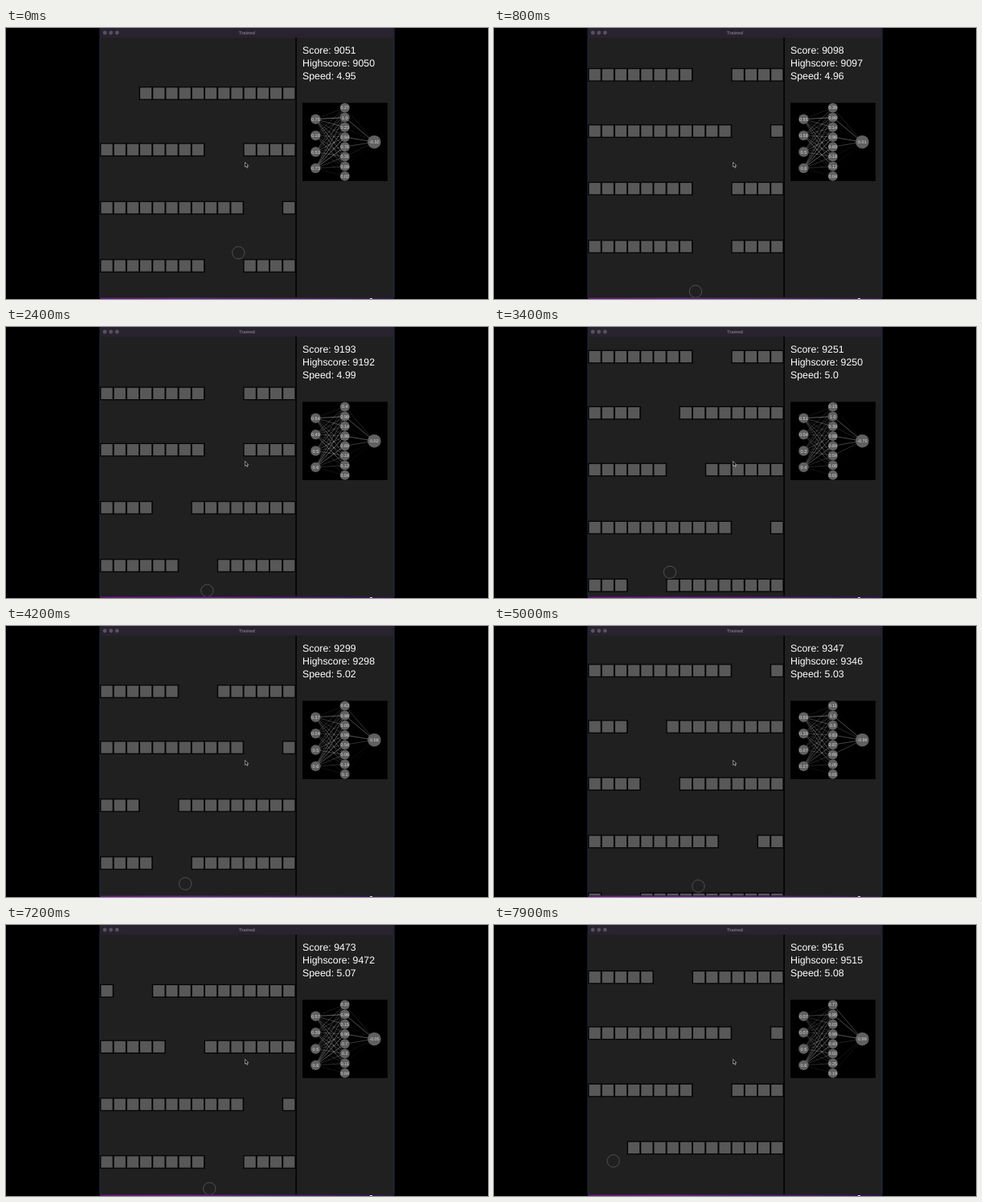
An HTML page for the animation above (8000 ms loop, 600 px wide and 338 px high).

```html
<!DOCTYPE html>
<html lang="en">
<head>
<meta charset="utf-8">
<title>Trained</title>
<style>
  html, body { margin: 0; width: 100%; height: 100%; overflow: hidden; background: #000; }
  svg { display: block; width: 600px; height: 338px; }
  text { font-family: "Liberation Sans", Arial, sans-serif; fill: #fff; text-rendering: geometricPrecision; }
  .stat { font-size: 12.36px; }
  .node { font-size: 5.5px; text-anchor: middle; fill: #e0e0e0; }
  .title { font-size: 5.6px; font-weight: bold; text-anchor: middle; fill: #7d7882; }
</style>
</head>
<body>
<svg viewBox="0 0 600 338">
  <defs>
    <clipPath id="field"><rect x="117" y="12" width="244" height="324"/></clipPath>
    <linearGradient id="dock">
      <stop offset="0" stop-color="#6a1a80"/>
      <stop offset=".3" stop-color="#6a2490"/>
      <stop offset="1" stop-color="#32174a"/>
    </linearGradient>
  </defs>
  <rect width="600" height="338"/>
  <rect x="116.5" width="367" height="336.4" fill="#263a5c"/>
  <rect x="117.3" width="365.4" height="336.4" fill="#202020"/>
  <rect x="117.3" width="365.4" height="12" fill="#29222f"/>
  <g fill="#57525d">
    <circle cx="123" cy="6" r="2.4"/><circle cx="130.6" cy="6" r="2.4"/><circle cx="138.2" cy="6" r="2.4"/>
  </g>
  <text class="title" x="300" y="8">Trained</text>
  <g id="play" clip-path="url(#field)"></g>
  <rect x="360.4" y="12" width="1.5" height="324"/>
  <rect x="117" y="336.4" width="366" height="1.6" fill="url(#dock)"/>
  <rect x="453" y="337" width="3" height="1" fill="#ddd"/>
  <g id="stats"></g>
  <rect x="369" y="93.3" width="106" height="97.7"/>
  <g id="net"></g>
  <path d="M297.6 167.4v6l1.4-1.2 1 2.2 1-.5-1-2.1h1.9z" fill="#000" stroke="#ddd" stroke-width=".6"/>
</svg>
<script>
const LOOP = 8000, STEP = 100;
const LEFT = 117.5, CELL = 16.2, COLS = 15, WIDTH = CELL * COLS;
const FLOOR = 328.8, REST = 16.3, SEEN = 341;
const HOME = LEFT + WIDTH * .55;

// Score at a few times; scrolling and speed follow from it
const times = [0, 1500, 3400, 5000, 6000, 7200, 7900];
const points = [0, 89, 200, 296, 354, 422, 465];
const FIRST_SCORE = 9051;

// First empty column of each row, in order of appearance
const holes = [0, 8, 11, 8, 8, 8, 4, 6, 11, 3, 4, 10, 1, 5, 11, 8, 0];

const byId = id => document.getElementById(id);
function add(parent, tag, attrs) {
  const el = document.createElementNS("http://www.w3.org/2000/svg", tag);
  for (const k in attrs) el.setAttribute(k, attrs[k]);
  return parent.appendChild(el);
}

const decimal = v => v.toFixed(2).replace(/0$/, "");
const sigmoid = v => 1 / (1 + Math.exp(-v));

function pointsAt(t) {
  let i = 1;
  while (i < times.length - 1 && t > times[i]) i++;
  const p = Math.max(0, (t - times[i - 1]) / (times[i] - times[i - 1]));
  return points[i - 1] + (points[i] - points[i - 1]) * p;
}

// Rows climb slightly faster as points grow, and bunch up near the top
function rowY(k, t) {
  const n = pointsAt(t);
  const y = 79.3 + 72.5 * k - .025 * k * k - n * (2.026 + .00006 * n);
  return y < 150 ? y + (150 - y) * .03 : y;
}

// The ball steers to the hole of the row it rides, drops through, then heads home
const SIM_START = -70, SIM_STEP = 10;
function simulate() {
  const path = [], dt = SIM_STEP / 1000;
  let x = 299, v = -110, y = FLOOR, row = 3;
  for (let t = SIM_START; t < LOOP; t += SIM_STEP) {
    let seen = row < holes.length && rowY(row, t) < SEEN;
    let target = HOME;
    if (seen) {
      const reach = (LEFT + (holes[row] + 1.5) * CELL - HOME) * 1.2;
      target += reach;
      if (Math.abs(target - x) < Math.max(8, Math.abs(reach) * .12)) {
        row++;
        seen = false;
        target = HOME;
      }
    }
    const out = Math.tanh((target - x) / 42);
    const support = row < holes.length ? rowY(row, t) - REST : FLOOR;
    y = Math.min(y, FLOOR, support);
    path.push({ x, y, out, hole: seen ? holes[row] : -1 });
    v += (360 * out - v) * dt / .05;
    x += v * dt;
    y += 200 * dt;
  }
  return path;
}
const path = simulate();

// Playing field
const rows = holes.map(hole => {
  const g = add(byId("play"), "g", {});
  const cells = [...Array(COLS).keys()].filter(c => c < hole || c >= hole + 3);
  for (const c of cells)
    add(g, "rect", { x: LEFT + c * CELL - .5, y: -8.4, width: CELL + 1, height: 16.8, fill: "#050505" });
  for (const c of cells)
    add(g, "rect", { x: LEFT + c * CELL + .9, y: -7.1, width: 14.2, height: 14.2, fill: "#585858" });
  return g;
});
const ball = add(byId("play"), "circle", { r: 7.7, fill: "none", stroke: "#505050", "stroke-width": 1 });

// Score lines
const stats = [31.5, 47.7, 63.9].map(y => add(byId("stats"), "text", { class: "stat", x: 369, y }));

// Network
let seed = 11;
const random = () => (seed = seed * 16807 % 2147483647) / 2147483647;
const nodes = [];
for (let i = 0; i < 4; i++) nodes.push({ x: 385.4, y: 113.7 + i * 20.4, r: 6.2 });
for (let i = 0; i < 8; i++) nodes.push({ x: 421.8, y: 99.4 + i * 12.2, r: 6 });
nodes.push({ x: 458.4, y: 142.2, r: 8.3 });

// Bias and gain of each hidden node against the steering output
const hidden = [[-.45, 1.7], [5, -2], [-1.8, -1.8], [3.2, 1.6], [.8, -1.1], [-1.5, -2.2], [-2, .9], [-3.2, 1.8]];

const links = [];
function link(from, to, weight) {
  const a = nodes[from], b = nodes[to];
  const el = add(byId("net"), "line",
    { x1: a.x, y1: a.y, x2: b.x, y2: b.y, stroke: "#fff", "stroke-width": .6 });
  links.push({ el, from, weight });
}
for (let h = 4; h < 12; h++) {
  for (let i = 0; i < 4; i++) link(i, h, h === 11 ? .15 : .2 + .7 * random());
  link(h, 12, .55);
}
for (const n of nodes) {
  add(byId("net"), "circle", { cx: n.x, cy: n.y, r: n.r, fill: "#606060" });
  n.label = add(byId("net"), "text", { class: "node", x: n.x, y: n.y + 2 });
}

function netValues(t, now, before) {
  const edges = now.hole < 0 ? [.5, .6] : [now.hole / COLS, (now.hole + 3) / COLS];
  const wave = .36 - .38 * Math.cos(2 * Math.PI * (t - 3800) / 4600);
  return [(before.x - LEFT) / WIDTH, wave, ...edges,
    ...hidden.map(([bias, gain]) => sigmoid(bias + gain * now.out)), now.out];
}

function draw(t) {
  rows.forEach((g, k) => {
    const y = rowY(k, t), shown = y > 20 && y < 346;
    g.setAttribute("visibility", shown ? "visible" : "hidden");
    g.setAttribute("transform", `translate(0 ${y.toFixed(2)})`);
  });

  const i = (t - SIM_START) / SIM_STEP, now = path[i];
  ball.setAttribute("cx", now.x);
  ball.setAttribute("cy", now.y);

  const n = Math.round(pointsAt(t)), score = FIRST_SCORE + n;
  stats[0].textContent = "Score: " + score;
  stats[1].textContent = "Highscore: " + (score - 1);
  stats[2].textContent = "Speed: " + decimal(4.948 + n * .00028);

  const values = netValues(t, now, path[i - 7]);
  nodes.forEach((node, j) => node.label.textContent = decimal(values[j]));
  for (const l of links) {
    const v = Math.min(1, Math.abs(values[l.from]));
    const strength = l.from < 4 ? .5 + .5 * v : v;
    l.el.setAttribute("stroke-opacity", (l.weight * strength).toFixed(3));
  }
}

const begin = performance.now();
function tick() {
  const t = (performance.now() - begin) % LOOP;
  draw(Math.floor(t / STEP) * STEP);
  requestAnimationFrame(tick);
}
tick();
</script>
</body>
</html>
```
